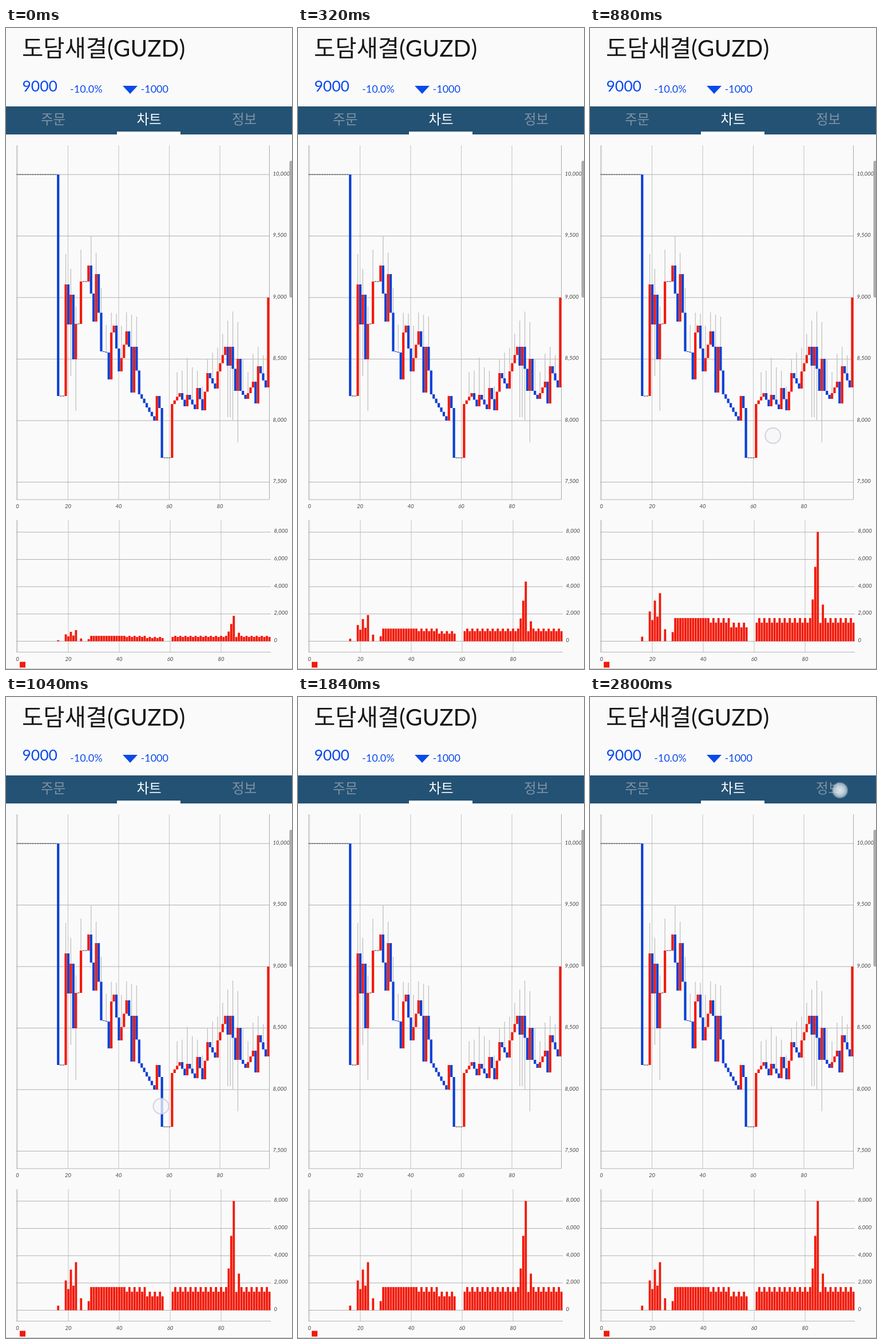
Write an HTML page with a canvas that moves like this. It is 500x1120 px and loops after 2.96 s.

```html
<!DOCTYPE html>
<html lang="ko">
<head>
<meta charset="utf-8">
<title>Chart</title>
<style>
  html, body { margin: 0; width: 100%; height: 100%; overflow: hidden; background: #fafafa; }
  canvas { display: block; width: 100%; height: 100%; }
</style>
</head>
<body>
<canvas id="stage" width="500" height="1120"></canvas>
<script>
const ctx = document.getElementById('stage').getContext('2d');
const LOOP = 2960, STEP = 80, SLOTS = 100;
const RED = '#f21a0b', BLUE = '#0a40d4', INK = '#0a49ec';
const SANS = "Lato, 'Noto Sans CJK KR', 'Noto Sans CJK', sans-serif";
const HANGUL = "'Noto Sans CJK KR', 'Noto Sans CJK', sans-serif";
const LABEL = `italic 9.5px ${SANS}`;

const PRICE = { left: 20, step: 4.425, top: 205, bottom: 824, right: 460 };
const VOLUME = { left: 20, step: 4.45, top: 860, bottom: 1090.5, right: 463, base: 1071.5 };

// Turning points of the price: slot, height in px. Slots between them are interpolated.
const turns = [
  [0, 256], [15, 256], [16, 643], [18, 643], [19, 448], [20, 518], [21, 466], [22, 579],
  [23, 517], [24, 517], [25, 443], [27, 443], [28, 415], [30, 513], [31, 430], [33, 565],
  [35, 567], [36, 614], [37, 532], [38, 520], [40, 600], [43, 530], [44, 557], [45, 637],
  [46, 557], [48, 640], [54, 686], [55, 643], [56, 664], [57, 751], [60, 751], [61, 657],
  [64, 638], [66, 661], [67, 641], [70, 666], [71, 629], [73, 668], [75, 603], [78, 630],
  [79, 600], [82, 557], [83, 590], [84, 557], [86, 634], [87, 578], [88, 634], [90, 648],
  [93, 618], [94, 656], [95, 591], [98, 628], [99, 471]
];

// Trading bursts: first slot and the bar heights that follow.
const bursts = [
  { from: 19, heights: [52, 37, 71, 43, 84, 0, 21, 0, 0, 16] },
  { from: 83, heights: [73, 130, 191, 32, 64] }
];

function seeded(seed) {
  return () => (seed = (seed * 16807) % 2147483647) / 2147483647;
}

function closeAt(slot) {
  const k = Math.max(1, turns.findIndex(p => p[0] >= slot));
  const [x0, y0] = turns[k - 1], [x1, y1] = turns[k];
  return y0 + (y1 - y0) * (slot - x0) / (x1 - x0);
}

// No trade leaves no bar; otherwise volume comes in units of 8 px.
function volumeAt(slot, flat) {
  if (flat) return 0;
  if (slot < 19) return 8;
  for (const { from, heights } of bursts) {
    if (slot >= from && slot < from + heights.length) return heights[slot - from];
  }
  let units = slot >= 43 && slot % 2 ? 4 : 5;
  if (slot > 50 && slot < 58) units--;
  return units * 8.1;
}

function makeCandles() {
  const rand = seeded(11);
  return Array.from({ length: SLOTS }, (_, i) => {
    const open = closeAt(Math.max(0, i - 1)), close = closeAt(i);
    const flat = open === close;
    const volume = volumeAt(i, flat);
    const calm = flat || i < 19 || (i > 48 && i < 62);
    const reach = 20 + 45 * rand();
    return {
      open, close, flat, volume,
      high: Math.min(open, close) - (calm || i % 2 === 0 || i === 99 ? 0 : reach),
      low: Math.max(open, close) + (volume > 60 ? 90 : 0)
    };
  });
}
const candles = makeCandles();

function rect(x, y, w, h, color) {
  ctx.fillStyle = color;
  ctx.fillRect(x, y, w, h);
}

function line(x1, y1, x2, y2, color, width = 1) {
  ctx.strokeStyle = color;
  ctx.lineWidth = width;
  ctx.beginPath();
  ctx.moveTo(x1, y1);
  ctx.lineTo(x2, y2);
  ctx.stroke();
}

function text(str, x, y, font, color, align = 'left') {
  ctx.font = font;
  ctx.fillStyle = color;
  ctx.textAlign = align;
  ctx.fillText(str, x, y);
}

function drawHeader() {
  text('도담새결(GUZD)', 28, 50, `40.5px ${SANS}`, '#161616');
  text('9000', 28.5, 111, `26.5px ${SANS}`, INK);
  text('-10.0%', 112, 113, `18px ${SANS}`, INK);
  text('-1000', 235.5, 113, `18px ${SANS}`, INK);
  ctx.fillStyle = INK;
  ctx.beginPath();
  ctx.moveTo(204, 101);
  ctx.lineTo(230, 101);
  ctx.lineTo(217, 115);
  ctx.fill();

  rect(0, 137, 500, 49, '#245274');
  const tab = `23.5px ${HANGUL}`;
  text('주문', 82.5, 168, tab, '#8093a5', 'center');
  text('차트', 250, 168, '500 ' + tab, '#ffffff', 'center');
  text('정보', 416.5, 168, tab, '#8093a5', 'center');
  rect(194, 181, 111, 5.5, '#ffffff');
}

function drawGrid(c, rows, labelX, labelY) {
  line(18.5, c.top, 18.5, c.bottom, '#c4c4c8');
  for (let i = 0; i < SLOTS; i += 20) {
    const x = c.left + c.step * i;
    line(x, c.top, x, c.bottom, '#c2c2c6');
    text(String(i), x, labelY, LABEL, '#444444', 'center');
  }
  for (const [value, y] of rows) {
    line(18, y, c.right, y, '#b0b0b0');
    text(value.toLocaleString('en-US'), labelX, y + 1.5, LABEL, '#444444');
  }
  line(18, c.bottom, c.right, c.bottom, '#b4b4b4');
}

function drawPrice() {
  const rows = Array.from({ length: 6 }, (_, k) => [10000 - 500 * k, 256 + 107.5 * k]);
  drawGrid(PRICE, rows, 466.5, 838.5);
  line(460.5, PRICE.top, 460.5, PRICE.bottom, '#a8a8ac');

  const slotX = i => PRICE.left + 0.4 + PRICE.step * i;
  candles.forEach((c, i) => line(slotX(i), c.high, slotX(i), c.low, '#c0c0c0', 1.3));
  candles.forEach((c, i) => {
    const x = slotX(i), top = Math.min(c.open, c.close);
    if (c.flat) line(x - 1.8, c.close, x + 1.8, c.close, '#333333');
    else rect(x - 2.1, top, 4.2, Math.abs(c.close - c.open), c.close < c.open ? RED : BLUE);
  });
}

function drawVolume(grow) {
  const rows = Array.from({ length: 5 }, (_, k) => [2000 * k, VOLUME.base - 47.65 * k]);
  drawGrid(VOLUME, rows, 468.5, 1105.5);
  candles.forEach((c, i) => {
    const h = c.volume * grow;
    rect(VOLUME.left + VOLUME.step * i - 1.9, VOLUME.base - h, 3.8, h, RED);
  });
  rect(24, 1107.5, 10, 10, RED);
}

function disc(x, y, r, fill, stroke) {
  ctx.beginPath();
  ctx.arc(x, y, r, 0, Math.PI * 2);
  ctx.fillStyle = fill;
  ctx.fill();
  if (!stroke) return;
  ctx.strokeStyle = stroke;
  ctx.lineWidth = 2;
  ctx.stroke();
}

function drawTouch(t) {
  if (t >= 640 && t < 1200) {
    const p = Math.min(1, (t - 640) / 400);
    ctx.globalAlpha = t < 720 ? 0.25 : t < 1120 ? 1 : 0.4;
    disc(393 - 122 * p, 708 + 7 * p, 13.5, 'rgba(246,246,250,.75)', 'rgba(205,205,216,.85)');
    ctx.globalAlpha = 1;
  }
  if (t >= 2800) {
    const glow = ctx.createRadialGradient(437, 163, 0, 437, 163, 15);
    glow.addColorStop(0, 'rgba(236,241,245,.92)');
    glow.addColorStop(0.5, 'rgba(212,222,230,.88)');
    glow.addColorStop(0.82, 'rgba(180,198,212,.75)');
    glow.addColorStop(1, 'rgba(120,150,175,0)');
    disc(437, 163, 15, glow);
  }
}

function frame(now) {
  const t = Math.floor((now % LOOP) / STEP) * STEP;
  rect(0, 0, 500, 1120, '#fafafa');
  drawHeader();
  drawPrice();
  drawVolume(Math.min(1, 0.232 + t * 0.00098));
  ctx.fillStyle = '#ababab';
  ctx.beginPath();
  ctx.roundRect(495.5, 232, 8, 239, 3);
  ctx.fill();
  rect(0, 1119, 500, 1, '#c4c4c4');
  drawTouch(t);
}

const begin = performance.now();
function tick() {
  frame(performance.now() - begin);
  requestAnimationFrame(tick);
}
tick();
</script>
</body>
</html>
```
